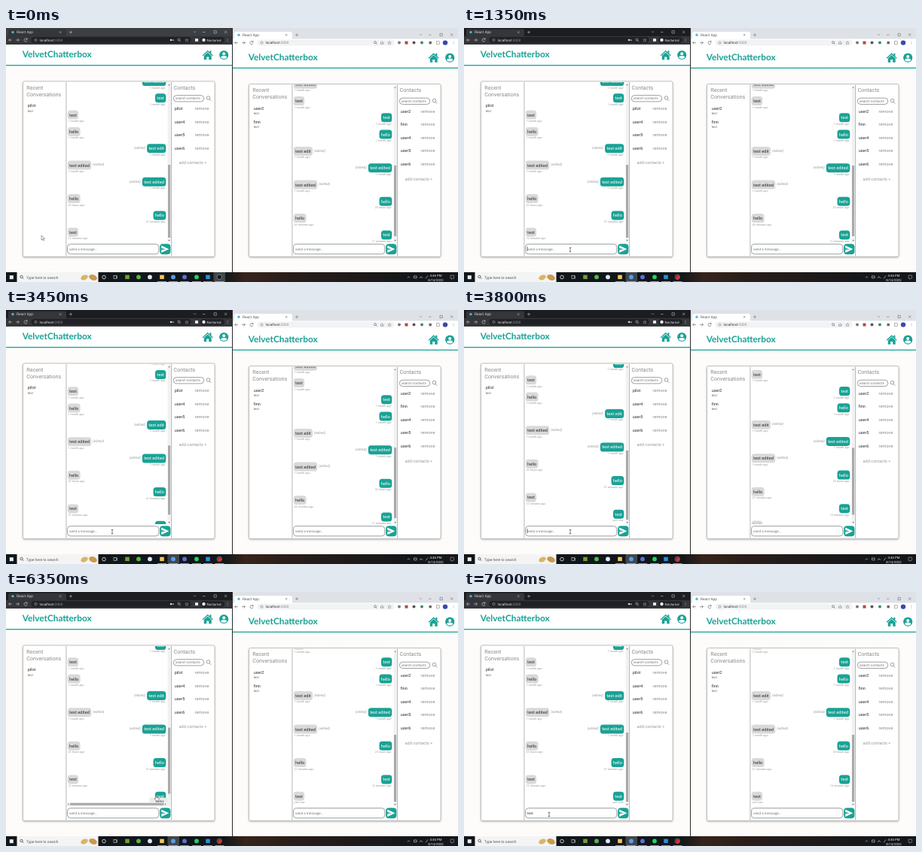
Recreate the animation shown at these times as an HTML page. Size 600 by 338 pixels, loop 8000 ms.

```html
<!DOCTYPE html>
<html lang="en">
<head>
<meta charset="utf-8">
<title>Two chat windows</title>
<style>
html, body { margin: 0; width: 100%; height: 100%; overflow: hidden; background: #fff; }
svg { display: block; width: 600px; height: 338px; }
text { font-family: Roboto, "Liberation Sans", sans-serif; text-rendering: geometricPrecision; white-space: pre; }
</style>
</head>
<body>
<svg id="stage" viewBox="0 0 600 338" xmlns="http://www.w3.org/2000/svg"></svg>
<script>
const LOOP = 8000, PITCH = 22.3;
const TEAL = '#1aa295', GRAY = '#8a8a8a', INK = '#2a2a2a';
const stage = document.getElementById('stage');
const pen = document.createElement('canvas').getContext('2d');

const rect = (x, y, w, h, fill, more = '') =>
  `<rect x="${x}" y="${y}" width="${w}" height="${h}" fill="${fill}" ${more}/>`;
const circle = (x, y, r, fill, more = '') =>
  `<circle cx="${x}" cy="${y}" r="${r}" fill="${fill}" ${more}/>`;
const path = (d, stroke, width = .7, fill = 'none') =>
  `<path d="${d}" fill="${fill}" stroke="${stroke}" stroke-width="${width}"/>`;
const text = (x, y, size, fill, str, more = '') =>
  `<text x="${x}" y="${y}" font-size="${size}" fill="${fill}" ${more}>${str}</text>`;
const group = (id, body, more = '') => `<g id="${id}" ${more}>${body}</g>`;
const lens = (x, y, r, color, w = .7) =>
  path(`M${x + r} ${y}A${r} ${r} 0 1 1 ${x - r} ${y}A${r} ${r} 0 1 1 ${x + r} ${y}M${x + r * .7} ${y + r * .7}l${r} ${r}`, color, w);
const star = (x, y, color) =>
  path(`M${x} ${y - 2}l.7 1.4 1.5.2-1.1 1 .3 1.5-1.4-.7-1.4.7.3-1.5-1.1-1 1.5-.2z`, color, .4);
const END = 'text-anchor="end"', MID = 'text-anchor="middle"';

function widthOf(str, size) {
  pen.font = '100px Roboto, "Liberation Sans", sans-serif';
  return pen.measureText(str).width * size / 100;
}

// text, sent from the left window, edited, age
const messages = [
  ['test edited', 1, 0, '1 month ago'],
  ['test', 1, 0, '1 month ago'],
  ['test', 0, 0, '1 month ago'],
  ['hello', 0, 0, '1 month ago'],
  ['test edit', 1, 1, '1 month ago'],
  ['test edited', 0, 1, '1 month ago'],
  ['test edited', 1, 1, '1 month ago'],
  ['hello', 0, 0, '23 hours ago'],
  ['hello', 1, 0, '27 minutes ago'],
  ['test', 0, 0, '12 minutes ago'],
  ['test', 1, 0, 'just now']
];

const windows = [
  { id: 'L', x: 0, top: 0, dark: true, last: 271.7, people: ['pilot'],
    contacts: ['pilot', 'user4', 'user5', 'user6'] },
  { id: 'R', x: 300, top: 3.6, dark: false, last: 275.4, people: ['user2', 'finn'],
    contacts: ['user2', 'finn', 'user4', 'user5', 'user6'] }
];

function bubble(win, [str, fromLeft, edited, age], i) {
  const out = !!fromLeft === win.dark;
  const y = win.last + PITCH * (i - 9), w = widthOf(str, 5.7) + 4.6;
  const x = out ? 212.3 - w : 81.8;
  let s = rect(x, y - 6, w, 12, out ? TEAL : '#d9d9d9', 'rx="3.6"') +
    text(x + 2.3, y + 2, 5.7, out ? '#fff' : INK, str);
  if (edited) s += text(out ? x - 2 : x + w + 2, y + .8, 4.5, '#999', '(edited)',
    `font-style="italic" ${out ? END : ''}`);
  return s + text(out ? 211.5 : 82.5, y + 9.5, 3.75, '#999', age,
    `id="${win.id}age${i}" ${out ? END : ''}`);
}

function browser(win) {
  const d = win.dark, o = win.top, y = 16 + o;
  const fg = d ? '#d5d7da' : '#55595e', bar = d ? '#35363a' : '#fff';
  let s = rect(0, 0, 300, 12 + o, '#dee1e6', `id="${win.id}strip"`) +
    rect(3, 1.5 + o, 77, 13, bar, 'rx="2.5"') + rect(0, 10.8 + o, 300, 11.9, bar) +
    circle(9, 5.6 + o, 1.7, '#4fb9d4') + text(14, 7.4 + o, 4.8, fg, 'React App') +
    path(`M71 ${4.4 + o}l2.4 2.4m0-2.4l-2.4 2.4M84 ${5.6 + o}h4m-2-2v4`, fg, .5) +
    path(`M249 ${4.5 + o}l1.5 1.5 1.5-1.5M261 ${5.5 + o}h3.5M276 ${3.7 + o}h3.3v3.3h-3.3zM290 ${3.7 + o}l3.3 3.3m0-3.3l-3.3 3.3`, fg, .5) +
    path(`M8 ${y}h-4.4m2-2l-2 2 2 2M13 ${y}h4.4m-2-2l2 2-2 2`, fg, .6) +
    path(`M28 ${y - 1}a2.1 2.1 0 1 0 .1 1.8m0-3.4v1.8h-1.8`, fg, .6) +
    rect(33.5, y - 4, d ? 212 : 182, 8, d ? '#202124' : '#f1f3f4', 'rx="4"') +
    circle(39.5, y, 1.6, 'none', `stroke="${fg}" stroke-width=".5"`) +
    text(44.5, y + 1.7, 4.7, d ? '#e8eaed' : '#333', 'localhost<tspan fill="#8b8e92">:3000</tspan>') +
    [-1.5, 0, 1.5].map(k => circle(294, y + k, .45, fg)).join('');
  if (d) {
    s += circle(219, y, 1.3, fg) + path(`M220 ${y}h3m-.7 0v1.2`, fg, .7) + lens(229.5, y - .4, 1.5, fg, .6) +
      star(240, y, fg) + rect(251, y - 1.9, 4, 3.8, '#e8eaed') +
      rect(258, y - 3.8, 32, 7.6, '#202124', 'rx="3.8"') +
      circle(262.5, y, 2.2, '#e8eaed') + text(266.5, y + 1.6, 4.4, '#e8eaed', 'Nocturnal');
  } else {
    s += lens(190, y - .4, 1.5, fg, .6) + path(`M197.5 ${y - 1}v2.6h3.6v-2.6M199.3 ${y + .6}v-3`, fg, .5) +
      star(209, y, fg) + circle(222, y, 2, '#777') + rect(229.5, y - 2, 4, 4, '#b9473f') +
      circle(241.5, y, 2, '#555') + circle(252, y, 2, '#3d8a67') + rect(261.5, y - 1.7, 3.4, 3.4, '#666') +
      rect(271.5, y - 1.8, 3.8, 3.6, 'none', 'stroke="#666" stroke-width=".5"') + circle(283, y, 3.2, '#3949ab');
  }
  return s;
}

function header(win) {
  const o = win.top, y = 36 + o;
  return rect(0, 22 + o, 300, 27.3, '#fff') + rect(0, 49 + o, 300, 1.3, TEAL) +
    text(21.8, 39.4 + o, 11.8, TEAL, 'VelvetChatterbox', 'font-weight="700" style="font-family:Lato,sans-serif"') +
    `<path d="M260.7 ${y + .2}L267.7 ${y - 6.3}l2.7 2.5v-2h2v3.9l2.4 2.1-.9 1-6.2-5.6-6.1 5.6zM262.8 ${y + 1}l4.9-4.5 5 4.5v5.2h-3.5v-3.8h-3v3.8h-3.4z" fill="${TEAL}"/>` +
    circle(289.2, y, 6.1, TEAL) + circle(289.2, y - 1.7, 2, '#fff') +
    `<path d="M285.2 ${y + 3.3}q0-2.4 4-2.4t4 2.4q-1.5 1.6-4 1.6t-4-1.6z" fill="#fff"/>`;
}

function card(win) {
  const o = win.top, id = win.id;
  let s = rect(22.5, 71 + o, 254.5, 233.3 - o, '#fff', 'rx="2" stroke="#a9a9a9" stroke-width=".7" filter="url(#soft)"') +
    rect(79.6, 72 + o, .7, 231.5 - o, '#999') + rect(219, 72 + o, .7, 231.5 - o, '#999') +
    text(27.3, 81.5 + o, 7.2, GRAY, 'Recent') + text(27.3, 90.5 + o, 7.2, GRAY, 'Conversations') +
    text(222.5, 81.5 + o, 7.2, GRAY, 'Contacts') +
    rect(222.4, 89.6 + o, 40.3, 8.3, '#fff', 'rx="4" stroke="#777" stroke-width=".7"') +
    text(224.8, 95.4 + o, 4.65, '#777', 'search contacts') + lens(268.5, 93 + o, 2.3, '#777');
  win.people.forEach((name, i) => {
    s += text(28.7, 105 + o + i * 18, 5.5, INK, name) + text(28.7, 111.5 + o + i * 18, 4.3, '#666', 'test');
  });
  win.contacts.forEach((name, i) => {
    s += text(223.7, 109 + o + i * 17.6, 5.5, INK, name) + text(250.6, 109 + o + i * 17.6, 5.7, GRAY, 'remove');
  });
  s += text(248, 111 + o + win.contacts.length * 17.6, 5.6, '#999', 'add contacts +', MID);
  const menu = win.dark ? group('menu',
    rect(190.3, 273.7, 27, 11.3, '#ececec') + rect(190.3, 285, 27, 12, '#cbcbcb') +
    text(204, 281.8, 7, '#555', 'edit', MID) + text(204.5, 293, 7, '#444', 'delete', MID)) : '';
  s += `<clipPath id="${id}clip">` + rect(80.5, 72 + o, 138, 213 - o, '#000') + '</clipPath>' +
    group(id + 'view', group(id + 'scroll', messages.map((m, i) =>
      i < 10 ? bubble(win, m, i) : group(id + 'new', bubble(win, m, i))).join('') + menu),
      `clip-path="url(#${id}clip)"`) +
    rect(214.6, 72.5 + o, 4, 212.5 - o, '#f1f1f1') + rect(215, 182, 3.2, 97, '#a9a9a9', `id="${id}thumb"`) +
    `<path d="M215.5 ${76.2 + o}h2.2l-1.1-1.4zM215.5 282h2.2l-1.1 1.4z" fill="#555"/>`;
  if (win.dark) s += group('sideways', rect(80.5, 280, 138, 5, '#f1f1f1') +
    rect(85, 280.8, 124.5, 3, '#a9a9a9') +
    '<path d="M83.2 281.2v2.2l-1.3-1.1zM211 281.2v2.2l1.3-1.1z" fill="#555"/>');
  return s + rect(81.6, 287.6, 121.2, 13.2, '#fff', 'rx="4" stroke="#7f8a89" stroke-width=".8"') +
    text(84, 295.8, 4.65, '#777', 'send a message...', `id="${id}hint"`) +
    rect(204.2, 287.2, 14.2, 14, TEAL, 'rx="4"') +
    '<path d="M206.3 289.4l10 4.8-10 4.8v-3.7l6-1.1-6-1.1z" fill="#fff"/>';
}

function taskbar() {
  const icons = [[161, '#6f9f35', 0], [176, '#54b948', 1], [191, '#dfe8f2', 1], [207, '#f0c75a', 0],
    [222, '#5c9be8', 1], [237, '#5f6fd8', 1], [253, '#1ed760', 1], [268, '#2a8fd8', 0]];
  let s = rect(0, 325, 600, 13, 'url(#bar)') + rect(4.8, 329.2, 5, 5, '#e8eef2') +
    rect(14.5, 325, 108, 13, '#f4f4f4') + lens(20.5, 331, 1.7, '#333') +
    text(27, 333.5, 4.9, '#555', 'Type here to search') +
    '<ellipse cx="104" cy="332" rx="5" ry="3.2" fill="#d9b566" transform="rotate(-25 104 332)"/>' +
    '<ellipse cx="115.5" cy="332" rx="5.5" ry="3.6" fill="#c99a4b" transform="rotate(20 115.5 332)"/>' +
    circle(130, 331.6, 2.3, 'none', 'stroke="#eee" stroke-width=".8"') +
    rect(143, 329.6, 3.4, 4, 'none', 'stroke="#ddd" stroke-width=".6"') + rect(147.3, 329.6, .6, 4, '#ddd') +
    rect(275.5, 325, 15.5, 13, '#40474c', 'id="recTab"') + rect(214.5, 325, 15.5, 13, '#40474c', 'id="webTab"');
  for (const [x, color, round] of icons) {
    s += round ? circle(x, 331.4, 2.9, color) : rect(x - 2.8, 328.7, 5.6, 5.4, color);
    if (x > 200) s += rect(x - 6, 337.1, 12, .9, '#76b9ed');
  }
  return s + circle(283.3, 331.4, 3.2, '#15171a', 'stroke="#aaa" stroke-width=".6"') +
    circle(283.8, 331.8, 2.5, '#d23434', 'id="recDot"') + rect(277.5, 337.1, 12, .9, '#76b9ed') +
    path('M533 332.4l1.5-1.6 1.5 1.6M541.5 330h3.6v2.8h-3.6zM549 333q2-4 4 0M557 333.5l3-4', '#ddd', .6) +
    text(570.5, 330.7, 4.3, '#eee', '4:46 PM', MID) + text(570.5, 336.7, 4.3, '#eee', '8/14/2022', MID) +
    path('M590 329.2h4.6v4h-2l-1 1.2v-1.2H590z', '#bbb', .5);
}

stage.innerHTML = `<defs>
  <pattern id="dots" width="6" height="6" patternUnits="userSpaceOnUse">
    ${rect(0, 0, 6, 6, '#fdfcfa') + circle(3, 3, .45, '#f1eee8')}</pattern>
  <linearGradient id="bar"><stop offset=".48" stop-color="#11161a"/><stop offset=".53" stop-color="#36241b"/>
    <stop offset=".62" stop-color="#2a1e19"/><stop offset=".9" stop-color="#14161a"/></linearGradient>
  <filter id="soft" x="-5%" y="-5%" width="110%" height="110%">
    <feDropShadow dx="0" dy="1" stdDeviation="1.2" flood-opacity=".3"/></filter></defs>` +
  rect(0, 0, 600, 338, 'url(#dots)') +
  windows.map(w => `<g transform="translate(${w.x})">${browser(w) + header(w) + card(w)}</g>`).join('') +
  rect(300, 0, 1, 325, '#2a2b2e') + taskbar() +
  text(84, 295.8, 4.65, INK, '', 'id="typed"') + rect(84, 291, .6, 6, '#111', 'id="caret"') +
  group('arrow', path('M0 0v6.2l1.5-1.4 1 2.2 1-.5-1-2.1h2z', '#444', .5, '#fff')) +
  group('beam', path('M-1.3-2.7h2.6M-1.3 2.7h2.6M0-2.7v5.4', '#222', .6)) +
  group('hand', path('M1 0q.8-.2.9.7v2l2.3.4q1 .2.9 1.2l-.5 2.7H1.4L-.8 4.5q-.2-.8.6-.7l.5.4V.7Q.3.1 1 0z', '#222', .5, '#fff'));

const el = id => document.getElementById(id);
const show = (id, on) => el(id).setAttribute('visibility', on ? 'visible' : 'hidden');
const move = (id, x, y) => el(id).setAttribute('transform', `translate(${x} ${y})`);
const ease = (t, a, b) => {
  const p = Math.min(1, Math.max(0, (t - a) / (b - a)));
  return p * p * (3 - 2 * p);
};
const within = (t, a, b) => t >= a && t < b;

const FOCUS = 1000, SENT = 3340, ARRIVED = 3660, MENU = 5600, EDIT = 6950;
const keyTimes = [2450, 2650, 2800, 2950];
const caretSpans = [[FOCUS, 1650], [2150, 3300], [3700, 4220], [4750, 5250]];
const route = [[50, 47, 276], [900, 141, 295], [4900, 141, 295], [5100, 194, 269], [5250, 194, 269],
  [5450, 199, 270], [6050, 199, 270], [6120, 198, 271], [6350, 198, 271], [6650, 199, 264],
  [EDIT, 199, 264], [7500, 113, 296]];

function pointer(t) {
  let [, x, y] = route[0];
  for (let i = 1; i < route.length; i++) {
    const [a, x0, y0] = route[i - 1], [b, x1, y1] = route[i];
    if (t < a) break;
    const p = ease(t, a, b);
    x = x0 + (x1 - x0) * p;
    y = y0 + (y1 - y0) * p;
  }
  return [x, y];
}

function thumb(id, y, h) {
  el(id + 'thumb').setAttribute('y', y);
  el(id + 'thumb').setAttribute('height', h);
}

function draw(t) {
  const menu = within(t, MENU, EDIT), focused = t >= FOCUS;
  const sent = ease(t, SENT, 3630), got = ease(t, ARRIVED, 3970);
  const down = menu ? 16.8 * ease(t, 6350, 6650) : 0;
  move('Lscroll', 0, -PITCH * sent - down);
  move('Rscroll', 0, -26 * got);
  move('menu', 0, PITCH);
  show('menu', menu);
  show('sideways', menu);
  show('Lnew', t >= SENT);
  show('Rnew', t >= ARRIVED);
  if (menu) thumb('L', 180.5 + down * .45, 88);
  else if (t < SENT) thumb('L', 182, 97);
  else thumb('L', 177 + 10 * sent, 92);
  if (t < ARRIVED) thumb('R', 183, 94);
  else thumb('R', 178.4 + 11.6 * got, 89);
  el('Rage8').textContent = (t < ARRIVED ? 26 : 27) + ' minutes ago';
  el('Rage9').textContent = (t < ARRIVED ? 11 : 12) + ' minutes ago';

  const count = t >= EDIT ? 4 : t < SENT ? keyTimes.filter(k => t >= k).length : 0;
  const typed = 'test'.slice(0, count);
  el('typed').textContent = typed;
  show('Lhint', !count);
  show('caret', caretSpans.some(([a, b]) => within(t, a, b)));
  el('caret').setAttribute('x', 83.7 + widthOf(typed, 4.65));

  el('Lstrip').setAttribute('fill', focused ? '#1c1d20' : '#3c4043');
  show('recTab', !focused);
  show('recDot', focused);
  show('webTab', focused);

  const [x, y] = pointer(t);
  const kind = within(t, 6100, EDIT + 50) ? 'hand' : y > 287 && x > 81 && x < 203 ? 'beam' : 'arrow';
  for (const id of ['arrow', 'beam', 'hand']) show(id, id === kind);
  move(kind, x, y);
}

function frame() {
  draw(performance.now() % LOOP);
  requestAnimationFrame(frame);
}
frame();
</script>
</body>
</html>
```
